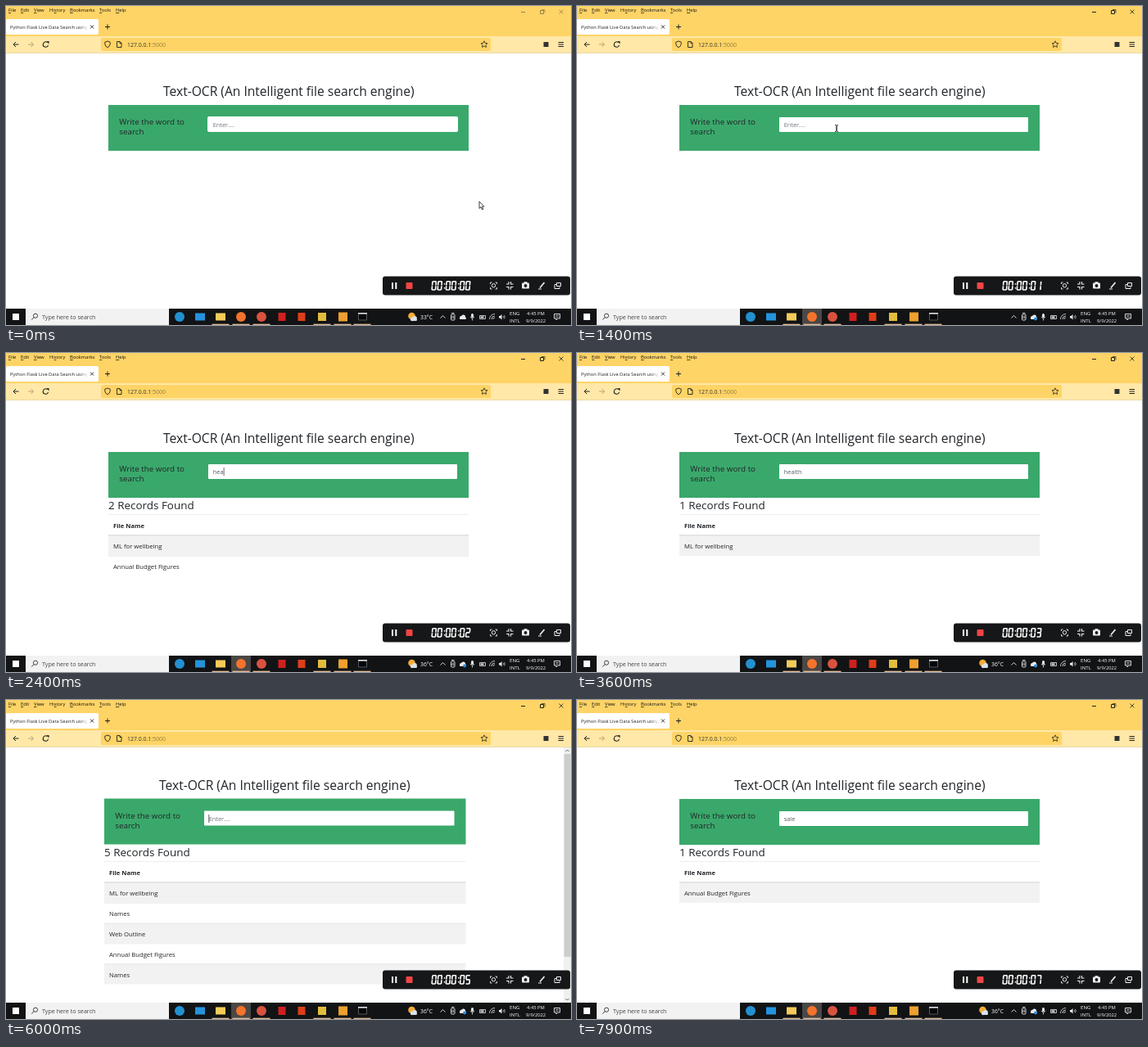
These frames come from a looping animation (690x390 px, 8 s). An HTML page with a canvas:

```html
<!DOCTYPE html>
<html>
<head>
<meta charset="utf-8">
<style>
html, body { margin: 0; width: 690px; height: 390px; overflow: hidden; background: #fff; }
canvas { display: block; }
</style>
</head>
<body>
<canvas id="stage" width="690" height="390"></canvas>
<script>
const ctx = document.getElementById('stage').getContext('2d');
const LOOP = 8000, STEP = 100;
const FACE = '"Open Sans", "Noto Sans", sans-serif';
const GOLD = '#ffd466', INK = '#212529', DARK = '#222', PANEL = '#161718';

const health = 'ML for wellbeing', report = 'Annual Budget Figures';
const ALL = [health, 'Names', 'Web Outline', report, 'Names'];
const PAIR = [health, report];

// [start, typed text, result rows]
const STATES = [
  [0, '', null], [1700, 'h', null], [1900, 'h', ALL], [2100, 'he', ALL],
  [2400, 'hea', PAIR], [2500, 'heal', PAIR], [2700, 'healt', PAIR],
  [2900, 'health', PAIR], [3000, 'health', [health]], [5100, 'healt', [health]],
  [5200, 'heal', [health]], [5300, 'hea', [health]], [5500, 'he', PAIR],
  [5700, 'h', PAIR], [5800, '', PAIR], [5900, '', ALL], [6500, 's', ALL],
  [6800, 'sa', ALL], [7100, 'sal', ALL], [7200, 'sal', PAIR],
  [7600, 'sale', PAIR], [7800, 'sale', [report]]
];
const CARET_OFF = [[0, 1000], [1400, 1700], [3500, 4100], [4700, 5100], [7800, 8000]];

function rect(x, y, w, h, fill, r = 0) {
  ctx.fillStyle = fill;
  ctx.beginPath();
  ctx.roundRect(x, y, w, h, r);
  ctx.fill();
}

function frame(x, y, w, h, color, r = 0, width = 1) {
  ctx.strokeStyle = color;
  ctx.lineWidth = width;
  ctx.beginPath();
  ctx.roundRect(x, y, w, h, r);
  ctx.stroke();
}

function disc(x, y, r, fill) {
  ctx.fillStyle = fill;
  ctx.beginPath();
  ctx.arc(x, y, r, 0, 7);
  ctx.fill();
}

function ring(x, y, r, color, width = 1, from = 0, to = 7) {
  ctx.strokeStyle = color;
  ctx.lineWidth = width;
  ctx.beginPath();
  ctx.arc(x, y, r, from, to);
  ctx.stroke();
}

function path(d, color, width = 1) {
  ctx.strokeStyle = color;
  ctx.lineWidth = width;
  ctx.stroke(new Path2D(d));
}

function shape(d, fill) {
  ctx.fillStyle = fill;
  ctx.fill(new Path2D(d));
}

function text(s, x, y, size, color = INK, weight = 400) {
  ctx.font = `${weight} ${size}px ${FACE}`;
  ctx.fillStyle = color;
  ctx.fillText(s, x, y);
  return ctx.measureText(s).width;
}

function menu(s, x, key) {
  text(s, x, 7.3, 5.8, '#111');
  const start = ctx.measureText(s.slice(0, key)).width;
  rect(x + start, 8.2, ctx.measureText(s[key]).width, .7, '#111');
}

function browser(active) {
  rect(0, 0, 690, 37, GOLD);
  [['File', 3, 0], ['Edit', 18, 0], ['View', 34, 0], ['History', 53, 2],
   ['Bookmarks', 78, 0], ['Tools', 114, 0], ['Help', 134, 0]]
    .forEach(([s, x, key]) => menu(s, x, key));

  const control = active ? '#222' : '#98804a';
  path('M629 7.5h5', control);
  frame(652.5, 5.5, 4, 4, control);
  path('M654 4.5h4v4', control, .7);
  path('M675.5 4.5l5 5m0-5l-5 5', control, .8);

  rect(0, 16, 113, 19, '#fff', 2);
  ctx.save();
  ctx.beginPath();
  ctx.rect(0, 16, 100, 19);
  ctx.clip();
  text('Python Flask Live Data Search using', 5, 28, 5.72, DARK);
  ctx.restore();
  const fade = ctx.createLinearGradient(90, 0, 100, 0);
  fade.addColorStop(0, '#fff0');
  fade.addColorStop(1, '#fff');
  rect(90, 20, 11, 12, fade);
  path('M103 23.5l4 4m0-4l-4 4', DARK, .9);
  path('M121 25.5h6m-3-3v6', DARK);

  rect(0, 37, 690, 20, '#ffe8a8');
  rect(0, 57, 690, .7, '#e9d79f');
  rect(116, 39, 476, 16, GOLD, 2);
  path('M15.5 47H9m3-3l-3 3 3 3', DARK);
  path('M27 47h6.5m-3-3l3 3-3 3', '#b9a572');
  ring(48.5, 47, 3.2, DARK, 1.1, .3, 5.4);
  shape('M49.5 43h3v3.4z', DARK);
  path('M124 43l3.2 1.2v2.5q-.4 2.8-3.2 4-2.8-1.2-3.2-4v-2.5z', DARK, .9);
  path('M135.5 43.5h3.5l2 2v5h-5.5zM139 43.5v2h2', DARK, .9);
  const host = text('127.0.0.1', 148, 49.5, 6.93, '#333');
  text(':5000', 148 + host, 49.5, 6.93, '#937c3c');
  path('M584 42.8l1.2 2.6 2.8.3-2.1 1.9.6 2.8-2.5-1.4-2.5 1.4.6-2.8-2.1-1.9 2.8-.3z', DARK, .8);
  rect(656.5, 44, 6, 6, '#333');
  path('M674.5 44.5h6.5m-6.5 2.5h6.5m-6.5 2.5h6.5', DARK);
}

function caretOn(t) {
  return !CARET_OFF.some(([from, to]) => t >= from && t < to);
}

function page(t, query, rows) {
  const scroll = rows === ALL, active = t >= 1000;
  const left = scroll ? 120 : 125, width = scroll ? 441.5 : 440;
  rect(0, 57.7, 690, 313, '#fff');
  text('Text-OCR (An Intelligent file search engine)', left + 67, 109.5, 15.6);

  rect(left, scroll ? 120.5 : 121, width, 56, '#3aa86b');
  text('Write the word to', left + 13.3, 145, 9.8);
  text('search', left + 13.3, 157, 9.8);
  if (active) rect(left + 122, scroll ? 135.5 : 136, width - 136, 18, '#fff', 1);
  else rect(left + 121, 135, width - 134, 19, '#fff', 2);

  const x = left + 127.7;
  const typed = text(query || 'Enter....', x, 147.7, 7.4, query ? '#565d64' : '#6c757d');
  if (caretOn(t)) rect(x + (query ? typed : -.5) + .2, 140, .8, 10, '#444');

  if (rows) results(rows, left, width);
  if (scroll) {
    rect(681, 58, 9, 312, '#f0f0f0');
    rect(681.7, 66, 8, 248, '#cdcdcd');
    path('M683.5 63l2-2 2 2M683.5 365l2 2 2-2', '#555', .9);
  }
}

function results(rows, left, width) {
  text(`${rows.length} Records Found`, left, 191, 13.45);
  rect(left, 197.3, width, .6, '#e6e8ea');
  text('File Name', left + 6, 214, 7.6, INK, 700);
  rows.forEach((name, i) => {
    const y = 223 + i * 24.9;
    if (i % 2 === 0) rect(left, y, width, 24.9, '#f2f2f2');
    rect(left, y, width, .6, '#dee2e6');
    text(name, left + 6, y + 16.2, 7.7);
  });
  rect(left, 222, width, 1.2, '#dee2e6');
}

// Segments lit per digit, as bits a to g
const DIGITS = [63, 6, 91, 79, 102, 109, 125, 7];
const SEGMENTS = ['M.8 .8h4.4', 'M5.2 .8v4.700', 'M5.2 6.3v4.700', 'M.8 11h4.4',
  'M.8 6.3v4.700', 'M.8 .8v4.700', 'M.8 5.9h4.4'].map(d => new Path2D(d));

function digit(n, x, y) {
  ctx.save();
  ctx.translate(x, y);
  ctx.transform(1, 0, -.08, 1, .5, 0);
  ctx.strokeStyle = '#fff';
  ctx.lineWidth = 1.6;
  SEGMENTS.forEach((segment, i) => DIGITS[n] >> i & 1 && ctx.stroke(segment));
  ctx.restore();
}

function recorder(t) {
  const seconds = Math.max(0, Math.floor((t - 150) / 1000)), white = '#eee';
  rect(460, 330.5, 229, 23, PANEL, 3);
  rect(471, 338, 2, 8, '#fff');
  rect(475.3, 338, 2, 8, '#fff');
  rect(488.5, 338, 8, 8, '#f04545', 1);
  [0, 0, 0, 0, 0, seconds].forEach((n, i) =>
    digit(n, 519.7 + i * 7 + (i >> 1) * 3.2, 336));
  [534.8, 552].forEach(x => {
    rect(x, 339, 1.4, 1.6, '#fff');
    rect(x, 344, 1.4, 1.6, '#fff');
  });
  ring(595.5, 341.8, 2.2, white);
  path('M591.5 340v-2h2m4 0h2v2m0 4v2h-2m-4 0h-2v-2', white, .9);
  path('M611 340h3v-3m2.5 0v3h3m0 3.5h-3v3m-2.5 0v-3h-3', white, 1.1);
  rect(630, 338.5, 9, 7, white, 1);
  rect(632.5, 337.2, 4, 2, white);
  disc(634.5, 342, 1.9, PANEL);
  path('M652 344.5l5.5-6.5', white, 1.7);
  path('M650 346h4', white, 1);
  frame(672.5, 338.5, 5, 4, white, 0, 1);
  path('M672 340.5h-2v5h6v-2', white, 1);
}

function weather(degrees) {
  disc(495.5, 379, 4.3, '#f6ad35');
  disc(496, 383, 2.2, '#d9e2ec');
  disc(499, 381.8, 2.8, '#d9e2ec');
  rect(495, 382, 7, 3, '#d9e2ec', 1.5);
  text(degrees + '°C', 506, 382.6, 6.8, '#fff');
}

function taskbar(t) {
  rect(0, 370, 690, 20, '#111315');
  rect(8, 376, 8, 8, '#fff');
  rect(24, 370, 175, 20, '#f2f2f2');
  ring(36, 378.7, 2.6, '#333', .9);
  path('M34.2 380.6l-3 3', '#333', 1);
  text('Type here to search', 44, 382.7, 7.17, '#444');

  if (t >= 1000) rect(275, 370, 24, 20, '#4a4745');
  [262, 287, 312, 386, 411, 435].forEach(x => rect(x - 10.5, 388.7, 21, 1.3, '#e6bd98'));
  disc(212, 380, 6, '#2391d0');
  rect(231, 375.5, 12, 9, '#2593dc');
  rect(256, 375.5, 12, 9, '#f5cb58');
  disc(287, 380, 6, '#f4732c');
  disc(312, 380, 6, '#d9523f');
  rect(332.5, 375, 9, 10, '#cf2020');
  rect(356.5, 375, 9, 10, '#df3d19');
  rect(381, 375, 10, 10, '#e2bd3c');
  rect(406, 374.5, 11, 11, '#eda02f');
  rect(430, 375.5, 11, 9, '#05070a');
  frame(430.5, 375.5, 10, 8.5, '#777c80', 0, .7);
  rect(430, 375, 11, 1.7, '#d5d8da');

  if (t < 1100) weather(33);
  else if (t >= 1500) weather(36);

  const light = '#e9ecef';
  path('M530.5 381.5l3-3 3 3', light, .9);
  frame(543.5, 377, 4.5, 7, light, 1, .9);
  ring(545.7, 380.5, 1.1, light, .8);
  path('M544 375.5h3.5', light, .8);
  disc(556, 381, 2, light);
  disc(558.5, 380, 2.5, light);
  rect(554, 380.5, 8, 2.5, light, 1.2);
  if (t >= 1200) disc(560, 382.5, 1.9, '#2b8ee0');
  rect(568, 376, 3, 5, light, 1.5);
  path('M567 380q2.5 4 5 0M569.5 382v2.5', light, .8);
  frame(578.5, 378.5, 7, 4, light, 0, .8);
  rect(579.5, 379.5, 4, 2, light);
  [2, 4, 6.5].forEach(r => ring(597, 383, r, light, .8, Math.PI, Math.PI * 1.5));
  shape('M602 379h1.5l2-2v6.5l-2-2H602z', light);
  [1.5, 3.2].forEach(r => ring(606, 380.2, r, light, .7, -.8, .8));
  text('ENG', 615, 377.8, 6.1, '#fff');
  text('INTL', 615, 386.7, 6.1, '#fff');
  text('4:45 PM', 636, 377.8, 5.85, '#fff');
  text('9/9/2022', 635, 386.7, 5.8, '#fff');
  path('M669.5 376.5h7v5.5h-3l-1.5 2v-2h-2.5z', light, .9);
  path('M671 378.5h4m-4 1.7h4', light, .6);
}

function pointer(t) {
  if (t >= 1700) return;
  const p = Math.min(1, t / 900);
  const ease = p * p * (3 - 2 * p);
  const x = 578 - 261 * ease, y = 239 - 89.5 * ease;
  ctx.save();
  ctx.translate(x, y);
  if (y > 135 && y < 154 && x < 551) {
    path('M-2-4q2 0 2 1v6q0 1-2 1M2-4q-2 0-2 1v6q0 1 2 1', '#222', .9);
  } else {
    const arrow = 'M0 0v8.5l2-1.8 1.5 3.3 1.3-.6-1.5-3.2h2.5z';
    shape(arrow, '#fff');
    path(arrow, '#111', .8);
  }
  ctx.restore();
}

function draw(now) {
  const t = Math.floor(now % LOOP / STEP) * STEP;
  const [, query, rows] = STATES.findLast(([start]) => start <= t);
  page(t, query, rows);
  browser(t >= 1000);
  recorder(t);
  taskbar(t);
  pointer(t);
}

const begin = performance.now();
function tick() {
  draw(performance.now() - begin);
  requestAnimationFrame(tick);
}
tick();
</script>
</body>
</html>
```
